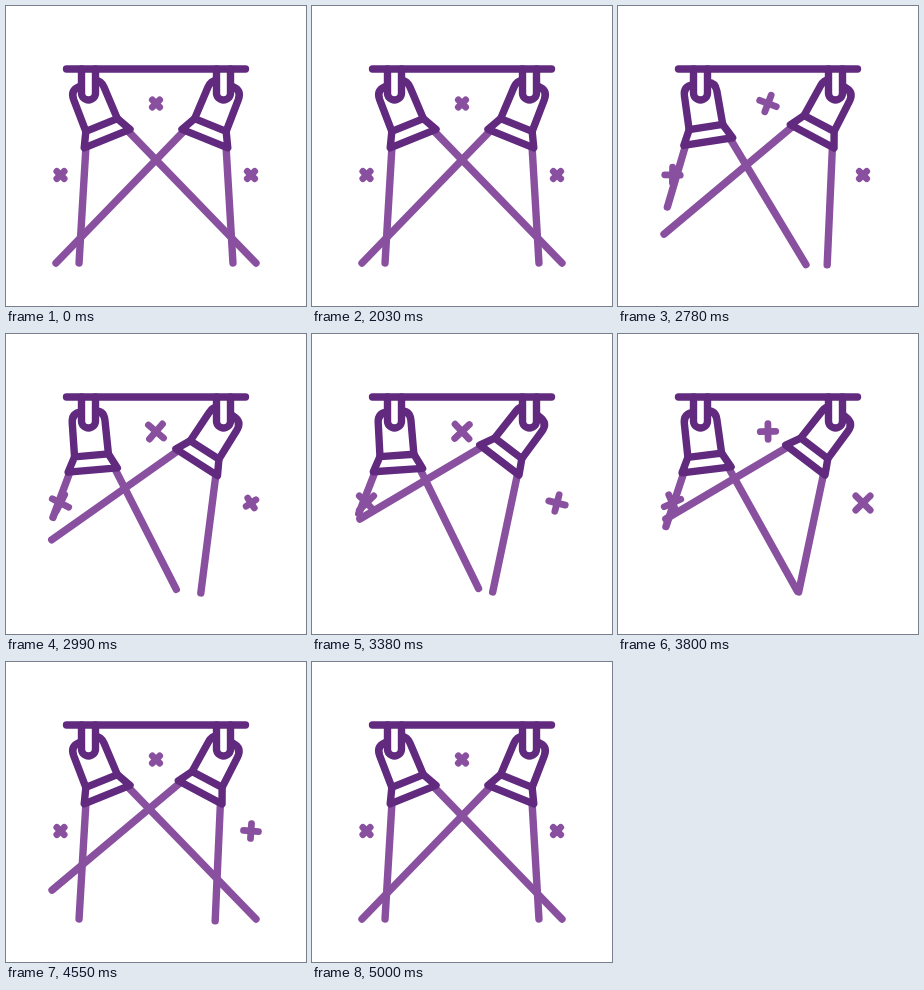
An HTML page with a canvas for the animation above (5.03 s loop, 300x300 px).

```html
<!DOCTYPE html>
<html lang="en">
<head>
<meta charset="utf-8">
<title>Stage lights</title>
<style>
  html, body { margin: 0; width: 100%; height: 100%; overflow: hidden; background: #fff; }
  canvas { display: block; width: 300px; height: 300px; }
</style>
</head>
<body>
<canvas id="stage"></canvas>
<script>
const LOOP = 5030, REST = 2030, STEP = 30, MOVE = 1000;
const DARK = '#612a7f', LIGHT = '#8a50a0';
const REST_ANGLE = 22;

const canvas = document.getElementById('stage');
const ctx = canvas.getContext('2d');
const dpr = window.devicePixelRatio || 1;
canvas.width = canvas.height = 300 * dpr;

const rad = deg => deg * Math.PI / 180;

// Eased 0 to 1 progress of a move that begins at `from`.
function move(t, from) {
  const x = Math.min(1, Math.max(0, (t - from) / MOVE));
  return x * x * (3 - 2 * x);
}

function line(x1, y1, x2, y2) {
  ctx.beginPath();
  ctx.moveTo(x1, y1);
  ctx.lineTo(x2, y2);
  ctx.stroke();
}

// Angle is measured from straight down, positive to the right.
function beam(x, y, deg, length) {
  line(x, y, x + Math.sin(rad(deg)) * length, y + Math.cos(rad(deg)) * length);
}

function lampShape() {
  ctx.beginPath();
  ctx.moveTo(-17, 35);
  ctx.lineTo(-16.4, 1);
  ctx.quadraticCurveTo(-16.2, -9, -6, -9);
  ctx.lineTo(6, -9);
  ctx.quadraticCurveTo(16.2, -9, 16.4, 1);
  ctx.lineTo(17, 35);
  ctx.stroke();

  ctx.beginPath();
  ctx.moveTo(-17, 35);
  ctx.lineTo(17, 35);
  ctx.lineTo(24.7, 49.7);
  ctx.lineTo(-24.7, 49.7);
  ctx.closePath();
  ctx.stroke();
}

function bracket() {
  ctx.beginPath();
  ctx.moveTo(-7, -23.5);
  ctx.lineTo(-7, 0.5);
  ctx.arc(0, 0.5, 7, Math.PI, 0, true);
  ctx.lineTo(7, -23.5);
  ctx.fillStyle = '#fff';
  ctx.fill();
  ctx.stroke();
}

// Runs `draw` at a lamp pivot; `side` is 1 for left, -1 for mirrored right.
function atLamp(side, turn, draw) {
  ctx.save();
  ctx.translate(150 - side * 67.5, 86.5);
  ctx.scale(side, 1);
  ctx.rotate(rad(-REST_ANGLE - turn));
  draw();
  ctx.restore();
}

// Grows and shrinks again while turning on in the same direction.
function star(x, y, t, grow, shrink) {
  const a = move(t, grow), b = move(t, shrink);
  const arm = 5.2 + 5 * (a - b);
  ctx.save();
  ctx.translate(x, y);
  ctx.rotate(rad(45 + 90 * (a + b)));
  line(-arm, 0, arm, 0);
  line(0, -arm, 0, arm);
  ctx.restore();
}

function draw(t) {
  ctx.setTransform(dpr, 0, 0, dpr, 0, 0);
  ctx.fillStyle = '#fff';
  ctx.fillRect(0, 0, 300, 300);
  ctx.lineCap = ctx.lineJoin = 'round';

  const left = 18 * (move(t, 95) - move(t, 1510));
  const right = 15.3 * (move(t, 325) - move(t, 1945));

  ctx.strokeStyle = LIGHT;
  ctx.lineWidth = 7.4;
  atLamp(1, -left, () => {
    beam(-23, 50, -25.4, 115.7 - 3.95 * left);
    beam(22, 50, 22.1, 184.4 - 2.85 * left);
  });
  atLamp(-1, right, () => {
    beam(-23, 50, -25.4, 115.7 + 0.3 * right);
    beam(22, 50, 22.1, 184.4 - 2.8 * right);
  });

  ctx.lineWidth = 6.8;
  star(150, 97.5, t, 90, 1275);
  star(54.5, 169, t, 245, 1460);
  star(245, 169, t, 740, 1990);

  ctx.strokeStyle = DARK;
  ctx.lineWidth = 7.4;
  atLamp(1, -left, lampShape);
  atLamp(-1, right, lampShape);
  for (const x of [82.5, 217.5]) {
    ctx.save();
    ctx.translate(x, 86.5);
    bracket();
    ctx.restore();
  }
  line(60.5, 63, 239.5, 63);
}

const start = performance.now();

function frame() {
  const now = (performance.now() - start) % LOOP;
  draw(Math.max(0, Math.floor((now - REST) / STEP) * STEP));
  requestAnimationFrame(frame);
}
frame();
</script>
</body>
</html>
```
